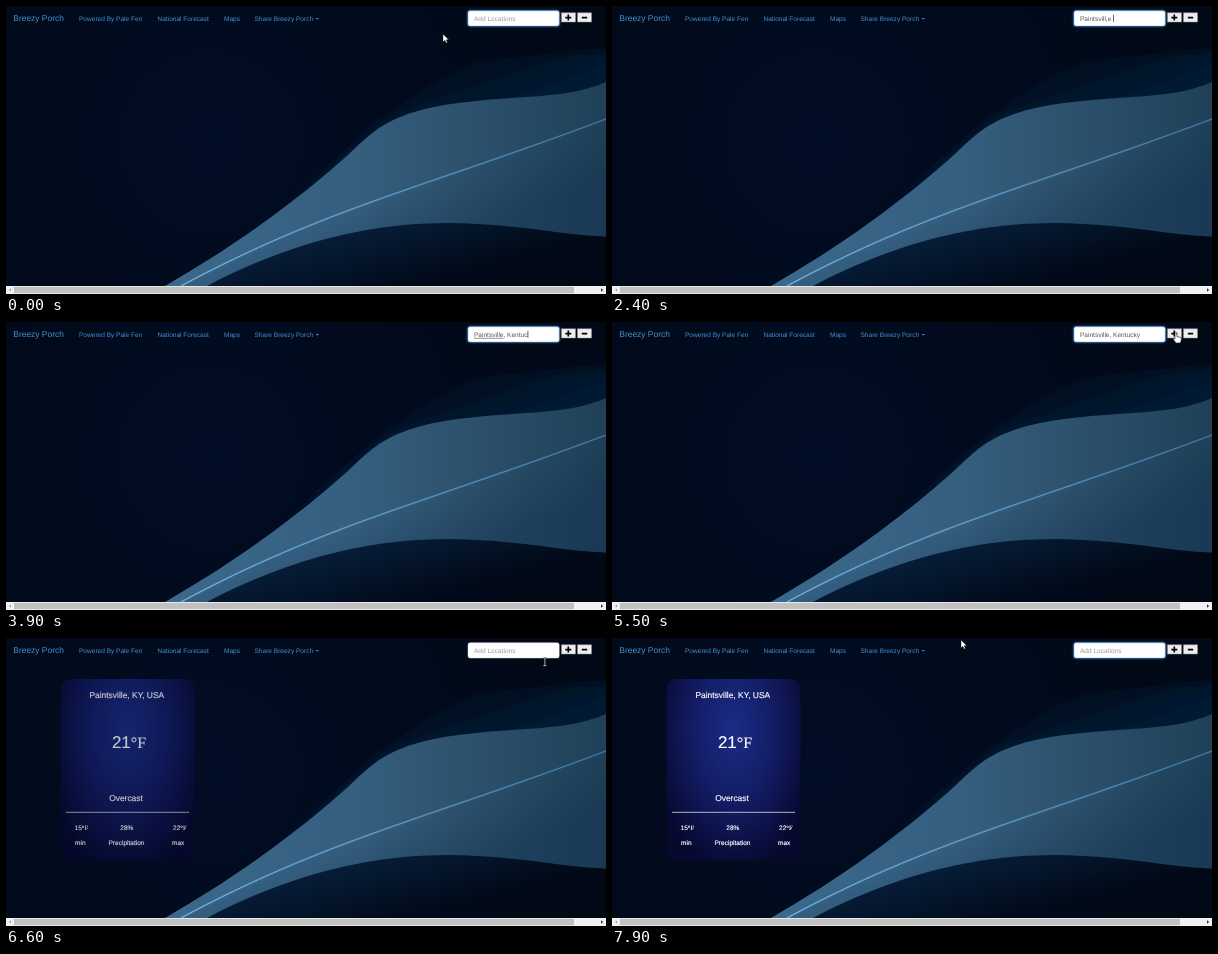
These frames come from a looping animation (600x288 px, 8 s). An HTML page:

```html
<!DOCTYPE html>
<html lang="en">
<head>
<meta charset="utf-8">
<title>Weather page</title>
<style>
  html, body { margin: 0; width: 100%; height: 100%; overflow: hidden; background: #010a1c; }
  svg { display: block; width: 600px; height: 288px; }
  text { font: 6.56px "Liberation Sans", Arial, sans-serif; text-rendering: geometricPrecision; white-space: pre; }
  .nav text, .nav path { fill: #4690d2; }
  .nav .brand, #card .mid { font-size: 8.44px; }
  #card text { fill: #fff; stroke: #fff; stroke-width: .18px; text-anchor: middle; }
  #card .big { font-size: 17px; }
  .deg { font-family: "Liberation Serif", "Times New Roman", serif; }
</style>
</head>
<body>
<svg viewBox="0 0 600 288">
  <defs>
    <radialGradient id="night" gradientUnits="userSpaceOnUse" cx="205" cy="135" r="330">
      <stop offset="0" stop-color="#020d26"/>
      <stop offset=".5" stop-color="#010b1d"/>
      <stop offset="1" stop-color="#010917"/>
    </radialGradient>
    <linearGradient id="wave" gradientUnits="userSpaceOnUse" x1="160" y1="0" x2="600" y2="0">
      <stop offset="0" stop-color="#3b698b"/>
      <stop offset=".43" stop-color="#355e7f"/>
      <stop offset=".65" stop-color="#2e536f"/>
      <stop offset="1" stop-color="#1f4058"/>
    </linearGradient>
    <linearGradient id="shade" gradientUnits="userSpaceOnUse" x1="440" y1="165" x2="460" y2="225">
      <stop offset="0" stop-color="#0d2b4a" stop-opacity="0"/>
      <stop offset="1" stop-color="#0d2b4a" stop-opacity=".35"/>
    </linearGradient>
    <linearGradient id="upper" gradientUnits="userSpaceOnUse" x1="470" y1="42" x2="490" y2="100">
      <stop offset="0" stop-color="#061f3a" stop-opacity="0"/>
      <stop offset="1" stop-color="#061f3a" stop-opacity=".75"/>
    </linearGradient>
    <linearGradient id="lower" gradientUnits="userSpaceOnUse" x1="400" y1="215" x2="415" y2="275">
      <stop offset="0" stop-color="#071f3a" stop-opacity=".85"/>
      <stop offset="1" stop-color="#071f3a" stop-opacity="0"/>
    </linearGradient>
    <linearGradient id="beam" gradientUnits="userSpaceOnUse" x1="175" y1="280" x2="600" y2="113">
      <stop offset="0" stop-color="#86c8f8"/>
      <stop offset=".4" stop-color="#6fb2e4"/>
      <stop offset="1" stop-color="#4686ba"/>
    </linearGradient>
    <radialGradient id="panel" cx="0" cy="0" r="1" gradientTransform="translate(.5 .28) scale(.62 .8)">
      <stop offset="0" stop-color="#1b2c86"/>
      <stop offset=".45" stop-color="#141e68"/>
      <stop offset="1" stop-color="#06082e"/>
    </radialGradient>
    <filter id="soft" x="-20%" y="-20%" width="140%" height="140%"><feGaussianBlur stdDeviation="4"/></filter>
    <filter id="halo" x="-20%" y="-60%" width="140%" height="220%"><feGaussianBlur stdDeviation="1"/></filter>
    <path id="ray" d="M175 280C320 202 420 181 600 113"/>
  </defs>

  <rect width="600" height="288" fill="url(#night)"/>
  <path d="M190 270C260 225 315 170 350 137C385 105 425 72 470 56C520 48 560 48 610 44V120L380 130Z" fill="url(#upper)" filter="url(#soft)"/>
  <path d="M195 280C270 235 360 205 440 205C510 205 560 215 600 220V280Z" fill="url(#lower)"/>
  <path d="M159 280C230 239 292 194 343 148C363 129 374 118 402 108C436 96 480 94 520 91C555 89 580 85 600 76V230.5C560 230 510 217 440 217C350 217 268 244.5 201 280Z" fill="url(#wave)"/>
  <path d="M175 280C320 202 420 181 600 113V230.5C560 230 510 217 440 217C350 217 268 244.5 201 280Z" fill="url(#shade)"/>
  <g fill="none" stroke="url(#beam)">
    <use href="#ray" stroke-width="2.4" opacity=".16"/>
    <use href="#ray" stroke-width=".9"/>
  </g>

  <g class="nav">
    <text class="brand" x="7.3" y="15.3">Breezy Porch</text>
    <text x="73" y="14.7">Powered By Pale Fen</text>
    <text x="151.5" y="14.7">National Forecast</text>
    <text x="218" y="14.7">Maps</text>
    <text x="248.5" y="14.7">Share Breezy Porch</text>
    <path d="M309.5 11.9h3.6l-1.8 1.7z"/>
  </g>

  <rect id="glow" x="461.3" y="4.2" width="92.6" height="16.4" rx="2.5" fill="#4b95dc" opacity=".65" filter="url(#halo)"/>
  <rect id="field" x="462" y="4.8" width="91.2" height="15.2" rx="2" fill="#fff" stroke-width=".5"/>
  <text id="entry" x="468" y="14.8"></text>
  <path id="spelling" d="M468 16.3h29.5" stroke="#666" stroke-width=".7"/>
  <path id="caret" stroke="#222" stroke-width=".7"/>

  <g fill="#eee" stroke="#999" stroke-width=".5">
    <path d="M555.5 6.8h14v9.2h-14zM571.5 6.8h14v9.2h-14z"/>
    <path d="M559.3 11.6h6M562.3 8.6v6M575.8 11.6h5.4" stroke="#000" stroke-width="1.6"/>
  </g>

  <g id="card">
    <rect x="54.5" y="41" width="134" height="181.5" rx="10" fill="url(#panel)"/>
    <text class="mid" x="120.8" y="59.5">Paintsville, KY, USA</text>
    <text class="big" x="123" y="110">21<tspan class="deg" font-size="16">°F</tspan></text>
    <text class="mid" x="120" y="163">Overcast</text>
    <path d="M60 174.3h123" stroke="#dde" stroke-width=".8"/>
    <text x="75.3" y="191.8">15<tspan class="deg">°F</tspan></text>
    <text x="120.8" y="191.8">28%</text>
    <text x="173.8" y="191.8">22<tspan class="deg">°F</tspan></text>
    <text x="74.3" y="206.8">min</text>
    <text x="120.5" y="206.8">Precipitation</text>
    <text x="172.2" y="206.8">max</text>
  </g>

  <rect y="280" width="600" height="8" fill="#f1f1f1"/>
  <rect x="8" y="280.8" width="560" height="6.4" fill="#c1c1c1"/>
  <path d="M5 282.5v3l-2-1.5z" fill="#999"/>
  <path d="M595 282.3v3.4l2.2-1.7z" fill="#333"/>

  <path id="arrow" d="M0 0V8L1.9 6.3L3.1 9.1L4.4 8.5L3.2 5.8H5.7Z" fill="#fff" stroke="#111" stroke-width=".4"/>
  <path id="ibeam" d="M-1.5 -3.8H1.5M0 -3.8V3.8M-1.5 3.8H1.5" fill="none" stroke="#ddd" stroke-width=".8" style="mix-blend-mode:difference"/>
  <path id="hand" d="M0 .6Q.9 -.6 1.8 .6V4L5.8 5Q6.7 5.4 6.4 6.8L5.5 10.5H.9L-2 6.4Q-1.7 5.2 0 6Z" fill="#fff" stroke="#111" stroke-width=".6"/>
</svg>
<script>
const LOOP = 8000, STEP = 100;
const TYPO = "Paintsvill,e ", PLACE = "Paintsville, Kentucky";
const CLEARED = 5700, FADE_START = 6220, FADE_TIME = 800;
const $ = id => document.getElementById(id);
const show = (id, on) => $(id).setAttribute("visibility", on ? "visible" : "hidden");

// time, x, y of the pointer
const path = [
  [0, 437, 28], [4600, 437, 28], [5300, 563, 10.5], [5700, 563, 10.5], [6400, 541, 23.8],
  [6900, 535, 23.8], [7200, 524, 15], [7500, 522, 14], [7700, 349, 2], [LOOP, 349, 2]
];

function pointerAt(t) {
  const i = path.findIndex(key => key[0] > t);
  const [t0, x0, y0] = path[i - 1], [t1, x1, y1] = path[i];
  const p = (t - t0) / (t1 - t0), e = p * p * (3 - 2 * p);
  return [x0 + (x1 - x0) * e, y0 + (y1 - y0) * e];
}

function typedAt(t) {
  if (t < 500 || t >= CLEARED) return "";
  if (t < 2500) return TYPO.slice(0, Math.floor((t - 500) / 150) + 1);
  const key = Math.floor((t - 2500) / 120) + 1;
  return key <= 3 ? TYPO.slice(0, -key) : PLACE.slice(0, 7 + key);
}

// CSS "ease": cubic-bezier(.25, .1, .25, 1)
function ease(p) {
  if (p <= 0 || p >= 1) return p <= 0 ? 0 : 1;
  const bezier = (a, b, u) => 3 * a * u * (1 - u) ** 2 + 3 * b * u * u * (1 - u) + u ** 3;
  let lo = 0, hi = 1;
  for (let i = 0; i < 20; i++) {
    const mid = (lo + hi) / 2;
    if (bezier(.25, .25, mid) < p) lo = mid; else hi = mid;
  }
  return bezier(.1, 1, lo);
}

function drawField(t) {
  const typed = typedAt(t), entry = $("entry");
  const focused = t < 5600 || t >= 7100;
  show("glow", focused);
  $("field").setAttribute("stroke", focused ? "#66afe9" : "#ddd");
  entry.textContent = (typed || "Add Locations").replace(/ /g, "\u00a0");
  entry.setAttribute("fill", typed ? "#555" : "#999");
  show("spelling", t >= 3300 && t < 4200);
  show("caret", typed && t < 4500);
  $("caret").setAttribute("d", `M${468.4 + entry.getComputedTextLength()} 8.8v7`);
}

function drawPointer(t) {
  const [x, y] = pointerAt(t);
  const hidden = t >= 500 && t < 4600;
  const kind = x > 555 && y < 17 ? "hand" : x > 461 && x < 554 && y < 25 ? "ibeam" : "arrow";
  for (const id of ["arrow", "ibeam", "hand"]) {
    show(id, !hidden && id === kind);
    $(id).setAttribute("transform", `translate(${x} ${y})`);
  }
}

function draw(time) {
  const t = Math.floor(time % LOOP / STEP) * STEP;
  drawField(t);
  drawPointer(t);
  $("card").setAttribute("opacity", ease((t - FADE_START) / FADE_TIME));
}

const start = performance.now();
function tick() {
  draw(performance.now() - start);
  requestAnimationFrame(tick);
}
tick();
</script>
</body>
</html>
```
